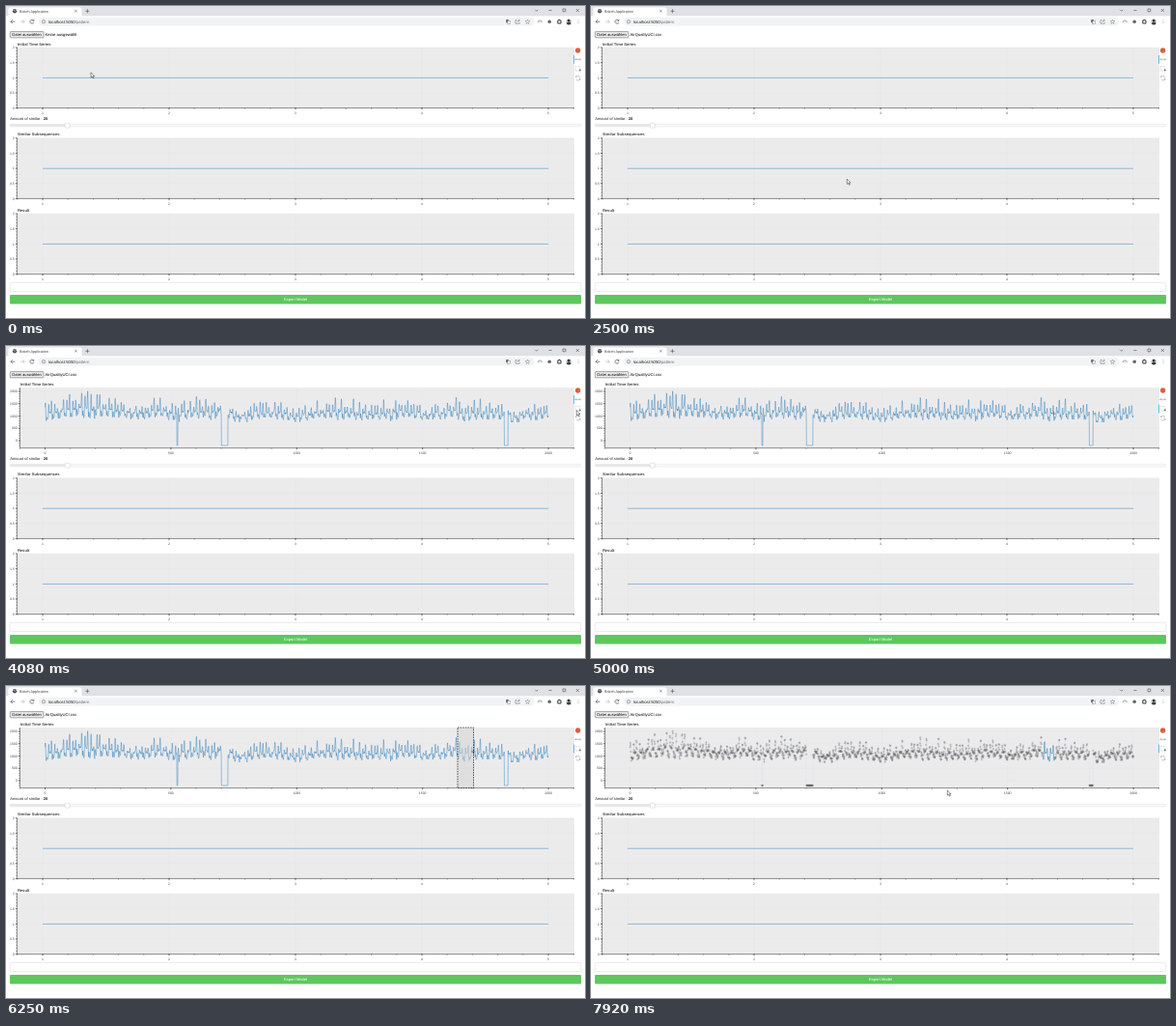
These frames come from a looping animation (600x323 px, 8000 ms). An HTML page:

```html
<!DOCTYPE html>
<html lang="de">
<head>
<meta charset="utf-8">
<title>Bokeh Application</title>
<style>
  html, body { margin: 0; width: 100%; height: 100%; overflow: hidden; background: #fff; }
  svg { display: block; width: 600px; height: 323px; }
  text { font-family: "Liberation Sans", Arial, sans-serif; text-rendering: geometricPrecision; }
</style>
</head>
<body>
<svg id="stage" viewBox="0 0 600 323"></svg>
<script>
const LOOP = 8000, TICK = 1000 / 12;
const BLUE = '#1f77b4', PANEL = '#ecebec', ICON = '#5f6368';
const stage = document.getElementById('stage');

function add(parent, tag, attrs = {}, content) {
  const node = document.createElementNS('http://www.w3.org/2000/svg', tag);
  for (const key in attrs) node.setAttribute(key, attrs[key]);
  if (content) node.textContent = content;
  return parent.appendChild(node);
}
const group = (parent = stage) => add(parent, 'g');
const rect = (p, x, y, width, height, fill, more) =>
  add(p, 'rect', { x, y, width, height, fill, ...more });
const line = (p, d, stroke = ICON, width = 0.5, more) =>
  add(p, 'path', { d, stroke, 'stroke-width': width, fill: 'none', ...more });
const circle = (p, cx, cy, r, fill, more) => add(p, 'circle', { cx, cy, r, fill, ...more });
const label = (p, x, y, size, content, fill = '#000', more) =>
  add(p, 'text', { x, y, 'font-size': size, fill, ...more }, content);
const show = (node, on) => node.setAttribute('visibility', on ? 'visible' : 'hidden');

function drawBrowser() {
  const g = group();
  rect(g, 0, 0, 600, 10.6, '#dfe1e4');
  rect(g, 2.5, 1.6, 76, 11, '#fff', { rx: 2 });
  circle(g, 9, 5.3, 2.2, '#4d5156');
  line(g, 'M7.2 4.6h1.6l.8 1.4M9.8 3.4l.2 1 .9.2', '#dde', 0.5);
  label(g, 14, 6.7, 3.75, 'Bokeh Application', '#3c4043');
  line(g, 'M71.2 4l2.4 2.4m0-2.4l-2.4 2.4', '#3c4043');
  line(g, 'M82.4 5.3h4M84.4 3.3v4', '#3c4043', 0.55);
  line(g, 'M548.2 3.8l1.5 1.5 1.5-1.5M562.4 4.5h3.2M577 3h2.8v2.8h-2.8zM590.8 3l3 3m0-3l-3 3', '#333');

  rect(g, 0, 10.6, 600, 11.4, '#fff');
  rect(g, 33.5, 11.8, 514, 8.8, '#f1f3f4', { rx: 4.4 });
  line(g, 'M9.3 16.2h-4.4m2-2l-2 2 2 2', '#454a4f', 0.65);
  line(g, 'M14.8 16.2h4.4m-2-2l2 2-2 2', '#b3b6ba', 0.6);
  line(g, 'M28.6 15a2 2 0 1 0 .3 1.7M28.9 13.8v1.5h-1.5', '#454a4f', 0.65);
  circle(g, 39, 16.2, 1.8, 'none', { stroke: ICON, 'stroke-width': 0.45 });
  line(g, 'M39 16v1.2M39 15v.5', ICON, 0.5);
  const url = label(g, 44, 17.8, 4.3, '', '#202124');
  add(url, 'tspan', {}, 'localhost:5050');
  add(url, 'tspan', { fill: '#6a6e73' }, '/pattern');

  rect(g, 518.2, 14.1, 2.7, 3, '#5f6368');
  rect(g, 519.8, 15.2, 2.7, 3.2, '#fff', { stroke: ICON, 'stroke-width': 0.4 });
  line(g, 'M529.6 14.6h-1.6v3.6h4.2v-1.2M530 16.6q.2-1.7 2.2-1.7m-1-1l1.2 1-1.2 1');
  line(g, 'M540.5 14l.7 1.5 1.6.2-1.2 1.1.3 1.6-1.4-.8-1.4.8.3-1.6-1.2-1.1 1.6-.2z', ICON, 0.4);
  line(g, 'M551 17.2a2.2 2.2 0 0 1 4.4 0M553.2 16.6v.8', ICON, 0.6);
  circle(g, 563.2, 16.2, 1.8, '#5e6469');
  line(g, 'M571.8 15h1v-.8h1v.8h1.2v3h-3.2z', '#33373b', 1);
  circle(g, 583.2, 16.2, 3, '#cfd2d4');
  circle(g, 583.2, 15.2, 1.4, '#3a3d40');
  add(g, 'path', { d: 'M580.8 18.3a2.5 2.4 0 0 1 4.8 0a3 3 0 0 1-4.8 0z', fill: '#3a3d40' });
  for (const y of [14.6, 16.2, 17.8]) circle(g, 593, y, 0.4, '#454a4f');
}

function drawForm() {
  const g = group();
  rect(g, 4.3, 26.6, 34.6, 6.2, '#efefef', { rx: 0.6, stroke: '#4c4c4c', 'stroke-width': 0.5 });
  label(g, 6.2, 31.2, 4.17, 'Datei auswählen');
  const amount = label(g, 4.2, 118.4, 4.06, 'Amount of similar : ', '#222');
  add(amount, 'tspan', { 'font-weight': 'bold' }, '20');
  rect(g, 4.2, 122.3, 591.6, 2.6, '#fafafa', { rx: 1, stroke: '#d3d3d3', 'stroke-width': 0.35 });
  rect(g, 4.4, 122.5, 59, 2.2, '#e6e6e6', { rx: 1 });
  rect(g, 61.2, 121.2, 5, 5, '#fff', { rx: 1.2, stroke: '#c8c8c8', 'stroke-width': 0.5 });
  rect(g, 4.2, 286.4, 591.6, 9.2, '#fff', { rx: 1, stroke: '#ccc', 'stroke-width': 0.4 });
  rect(g, 4, 299, 592, 9.6, '#5dc75d', { rx: 1 });
  label(g, 300, 305.1, 4.1, 'Export Model', '#fff', { 'text-anchor': 'middle' });
}

// Each axis holds the position of its first label, the spacing and the labels.
function drawChart(parent, left, top, title, xAxis, yAxis) {
  const right = 589, bottom = top + 62.6;
  const pos = axis => axis.labels.map((_, i) => axis.at + axis.step * i);
  rect(parent, left, top, right - left, bottom - top, PANEL);
  let grid = '', major = '', minor = '';
  pos(xAxis).forEach((x, i) => {
    grid += `M${x} ${top}V${bottom}`;
    major += `M${x} ${bottom - 0.6}v2.5`;
    label(parent, x, bottom + 6.2, 3.44, xAxis.labels[i], '#444', { 'text-anchor': 'middle' });
  });
  pos(yAxis).forEach((y, i) => {
    grid += `M${left} ${y}H${right}`;
    major += `M${left + 0.6} ${y}h-2.5`;
    label(parent, left - 2.7, y + 1.2, 3.44, yAxis.labels[i], '#444', { 'text-anchor': 'end' });
  });
  const small = (axis, lo, hi, draw) => {
    const gap = Math.abs(axis.step) / 5;
    for (let p = axis.at - Math.floor((axis.at - lo) / gap) * gap; p <= hi; p += gap) draw(p);
  };
  small(xAxis, left, right, x => minor += `M${x} ${bottom}v1.2`);
  small(yAxis, top, bottom, y => minor += `M${left} ${y}h-1.2`);
  line(parent, grid, '#e3e3e4', 0.35);
  line(parent, `M${left} ${top}V${bottom}H${right}`, '#111', 0.45);
  line(parent, major + minor, '#111', 0.36);
  label(parent, left + 0.5, top - 2.4, 4.1, title, '#444', { 'font-weight': 'bold' });
}

function drawFlatChart(parent, top, title) {
  drawChart(parent, 11.4, top, title,
    { at: 38, step: 131, labels: ['1', '2', '3', '4', '5'] },
    { at: top, step: 15.65, labels: ['2', '1.5', '1', '0.5', '0'] });
  line(parent, `M38 ${top + 31.4}H562`, BLUE, 0.45);
}

// Hourly readings: a morning and an evening peak each day, with three outages.
function makeSeries() {
  let seed = 41;
  const random = () => (seed = (seed * 16807) % 2147483647) / 2147483647;
  const peaks = [58, 52, 46, 47, 52, 55, 53, 56, 53, 54, 64, 57, 56, 64,
                 57, 53, 55, 61, 51, 56, 60, 52, 57, 53, 64, 56, 57];
  const gaps = [[524, 527], [701, 726], [1825, 1839]];
  const bump = (h, at, width) => Math.exp(-(((h - at) / width) ** 2));
  const points = [];
  let dawn = 0.6, dusk = 0.8, dip = 0, drift = 0;
  for (let i = 0; i <= 2000; i++) {
    const hour = (i + 18) % 24;
    if (hour === 0) {
      dawn = 0.2 + random() * 0.6;
      dusk = 0.4 + 0.6 * random() ** 1.3;
      dip = (random() - 0.5) * 4;
    }
    const k = i / 2000 * (peaks.length - 1), n = Math.floor(k);
    const peak = peaks[n] + ((peaks[n + 1] ?? peaks[n]) - peaks[n]) * (k - n);
    const low = 77.5 - (64 - peak) * 0.2 + dip;
    const shape = dawn * bump(hour, 8.5, 1.8) + dusk * bump(hour, 19.5, 2)
      + 0.36 * bump(hour, 14, 5) + 0.25 * bump(hour, 0, 3);
    drift = drift * 0.7 + (random() - 0.5) * 2.4;
    const y = Math.min(79, low - (low - peak) * Math.min(1, shape) + drift);
    const out = gaps.some(([a, b]) => i >= a && i <= b);
    points.push([40.5 + i * 0.2608, out ? 103 : y]);
  }
  return points;
}

const toPath = points => 'M' + points.map(p => p.map(v => v.toFixed(2)).join(' ')).join('L');

drawBrowser();
drawForm();
const noFile = label(stage, 40.6, 31.2, 4.17, 'Keine ausgewählt');
const file = label(stage, 40.6, 31.2, 4.17, 'AirQualityUCI.csv');

const before = group(), after = group();
drawFlatChart(before, 43, 'Initial Time Series');
drawFlatChart(stage, 136.8, 'Similar Subsequences');
drawFlatChart(stage, 215, 'Result');
drawChart(after, 14.4, 43, 'Initial Time Series',
  { at: 40.5, step: 130.4, labels: ['0', '500', '1000', '1500', '2000'] },
  { at: 98, step: -12.75, labels: ['0', '500', '1000', '1500', '2000'] });

const SELECT_X = 468;
const series = makeSeries();
const inside = p => p[0] > SELECT_X && p[0] < 480.8;
const whole = line(after, toPath(series), BLUE, 0.42, { 'stroke-linejoin': 'round' });
const picked = group();
line(picked, toPath(series), BLUE, 0.4, { opacity: 0.1 });
const ring = ([x, y]) => `M${(x - 0.75).toFixed(2)} ${y.toFixed(2)}a.75.75 0 1 0 1.5 0a.75.75 0 1 0-1.5 0`;
add(picked, 'path', {
  d: series.filter(p => !inside(p)).map(ring).join(''),
  fill: '#999', 'fill-opacity': 0.25, stroke: '#555', 'stroke-opacity': 0.65, 'stroke-width': 0.32
});
line(picked, toPath(series.filter(inside)), BLUE, 0.45);

const box = rect(stage, SELECT_X, 43, 0, 62.6, '#d3d3d3', {
  'fill-opacity': 0.5, stroke: '#000', 'stroke-width': 0.65, 'stroke-dasharray': '1.5 1.1'
});

const tools = group();
circle(tools, 592.6, 46, 2.7, '#d9603f');
line(tools, 'M589.8 55.3h5.6m-4.6-1l-1 1 1 1m3.6-2l1 1-1 1', '#777', 0.5);
line(tools, 'M590.2 62.6h4.6v4.6h-4.6z', '#999', 0.4, { 'stroke-dasharray': '.9 .6' });
line(tools, 'M593.6 66.4h2.4m-1.2-1.2v2.4', '#444', 0.5);
line(tools, 'M590.6 73.6a2.2 2.2 0 0 1 4.2.4m.1 1.4a2.2 2.2 0 0 1-4.2.4M590.4 72.3v1.5h1.4m3.2 3v-1.5h-1.4', '#888', 0.45);
const active = rect(tools, 588.2, 51, 0.7, 8.8, '#26aae1');

const arrow = add(stage, 'path', {
  d: 'M0 0v5.2l1.2-1.1.9 2 .9-.4-.9-1.9h1.7z', fill: '#fff', stroke: '#111', 'stroke-width': 0.45
});
const cross = line(stage, 'M-2.4 0h4.8M0-2.4v4.8', '#222', 0.36);

// Pointer path: tick, x, y.
const path = [
  [0, 88, 68.8], [3, 101, 61.6], [14, 101, 61.6], [16, 94.6, 61.6], [17, 94.6, 61.6],
  [20, 150, 95], [24, 263, 181.5], [26, 265.3, 179.2], [30, 265.3, 179.2], [34, 450, 118],
  [38, 585, 80], [40, 586.5, 77], [42, 588, 86], [47, 591.6, 67.4], [49, 591.2, 66.6],
  [54, 591.2, 66.6], [60, 479.5, 70], [64, 468, 68], [65, 468, 68], [71, 490, 68],
  [73, 498, 68], [74, 497, 68], [75, 484.5, 68], [76, 484.5, 68], [83, 480.8, 68],
  [93, 480.8, 68], [95, 369.3, 108]
];

function pointer(tick) {
  const i = path.findIndex(k => k[0] >= tick);
  const b = path[i], a = path[Math.max(0, i - 1)];
  const f = b[0] > a[0] ? (tick - a[0]) / (b[0] - a[0]) : 0;
  return [a[1] + (b[1] - a[1]) * f, a[2] + (b[2] - a[2]) * f];
}

function draw(now) {
  const tick = Math.min(95, Math.floor((now % LOOP + 4) / TICK));
  const [x, y] = pointer(tick);
  const loaded = tick >= 32, released = tick >= 90, crosshair = tick >= 55 && tick < 94;
  show(noFile, tick < 29);
  show(file, tick >= 29);
  show(before, !loaded);
  show(after, loaded);
  show(whole, loaded && !released);
  show(picked, released);
  show(box, tick > 65 && !released);
  box.setAttribute('width', Math.max(0, x - SELECT_X));
  active.setAttribute('y', tick < 52 ? 51 : 60.6);
  for (const c of [arrow, cross]) c.setAttribute('transform', `translate(${x} ${y})`);
  show(arrow, !crosshair);
  show(cross, crosshair);
}

function loop() {
  draw(performance.now());
  requestAnimationFrame(loop);
}
loop();
</script>
</body>
</html>
```
